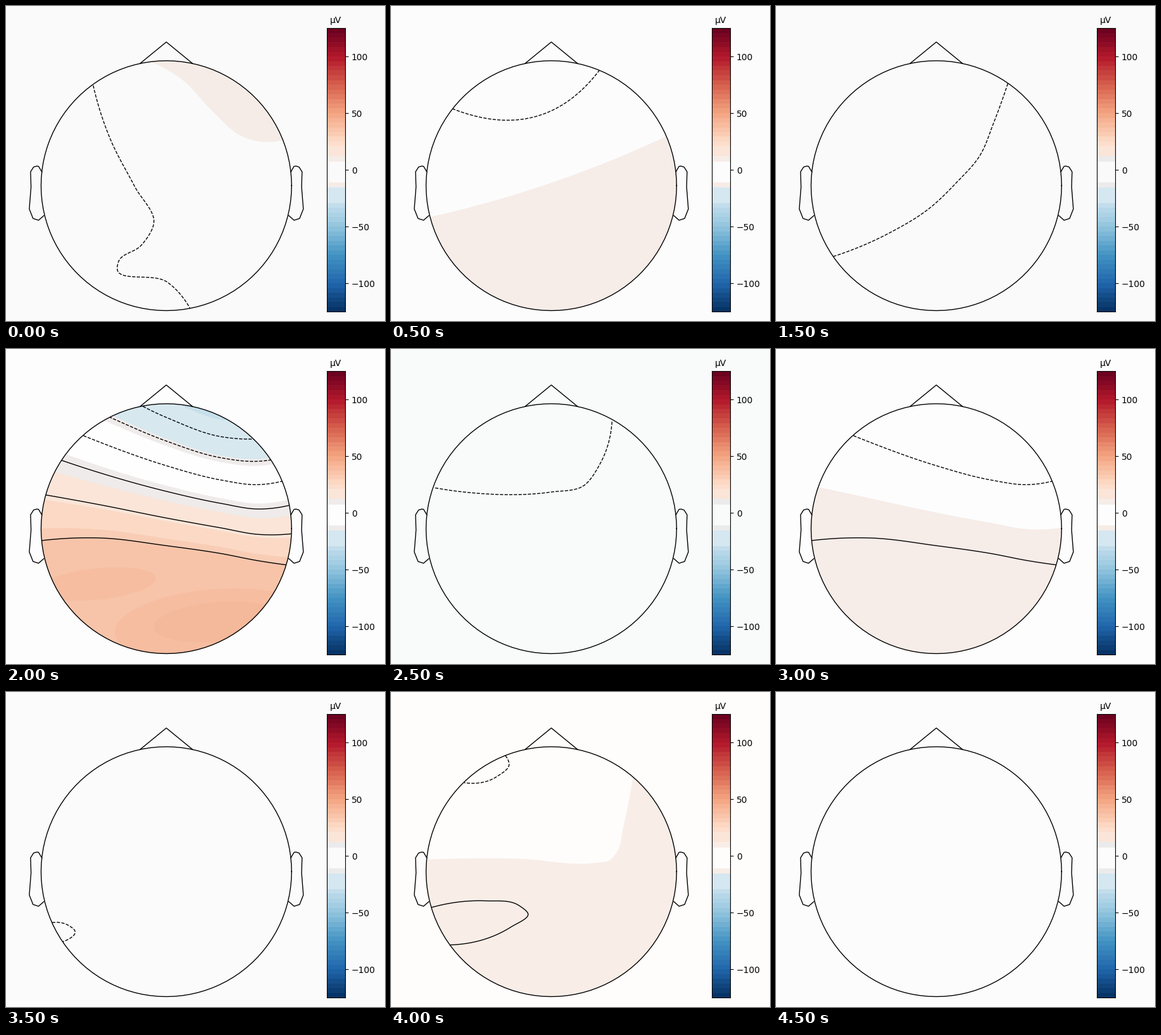
Write a matplotlib script that moves like this. It is 600 px wide and 500 px high and loops after 5 s.

```python
import numpy as np
import matplotlib
import matplotlib.pyplot as plt
from matplotlib.animation import FuncAnimation
from matplotlib.patches import Circle, Ellipse, Polygon

W, H, DPI = 600, 500, 100
CX, CY, R = 253.8, 285.2, 198.3

plt.rcParams["font.family"] = "DejaVu Sans"
fig = plt.figure(figsize=(W / DPI, H / DPI), dpi=DPI)
ax = fig.add_axes([0, 0, 1, 1])
ax.set_xlim(0, W)
ax.set_ylim(H, 0)
ax.axis("off")
disc = Circle((CX, CY), R, transform=ax.transData)
parts = []


def smooth(pts, n=14):
    """Hermite curve through the points, parametrised by chord length."""
    p = np.array(pts, float)
    t = np.r_[0, np.cumsum(np.hypot(*np.diff(p, axis=0).T))]
    m = np.gradient(p, t, axis=0, edge_order=2)
    u = np.linspace(0, 1, n)[:, None]
    out = []
    for k in range(len(p) - 1):
        h = t[k + 1] - t[k]
        out.append((2 * u**3 - 3 * u**2 + 1) * p[k]
                   + (u**3 - 2 * u**2 + u) * h * m[k]
                   + (3 * u**2 - 2 * u**3) * p[k + 1]
                   + (u**3 - u**2) * h * m[k + 1])
    return np.vstack(out)


def level(s):
    """Key points of the contour at height s of the back-to-front wave."""
    x = np.array([55, 150, 254, 340, 400, 453])
    base = np.array([165, 197, 226, 245, 254, 247])
    step = np.array([61, 49.5, 41.5, 38, 39.5, 44])
    bend = np.array([4.3, 1, 0.8, 0.9, 0.8, 2.2])
    return np.column_stack([x, base + step * s + bend * s**2])


def add(patch):
    ax.add_patch(patch)
    patch.set_clip_path(disc)
    parts.append(patch)


def line(pts, ls="-"):
    ln, = ax.plot(*smooth(pts).T, ls, color="k", lw=1, zorder=2)
    ln.set_clip_path(disc)
    parts.append(ln)


def dash(pts):
    line(pts, "--")


def fill(color, pts, edge=H):
    """Colour everything between the curve and the stage edge."""
    c = smooth(pts)
    (x0, y0), (x1, y1) = c[0], c[-1]
    rim = [(x1 + 60, y1), (W, edge), (0, edge), (x0 - 60, y0)]
    add(Polygon(np.vstack([c, rim]), fc=color, ec="none", zorder=1))


def lobe(color, x, y, a, b, tilt):
    add(Ellipse((x, y), 2 * a, 2 * b, angle=tilt, fc=color, ec="none",
                zorder=1))


def front_patch(pale):
    fill(pale, [(225, 87), (275, 114), (330, 170), (372, 206), (412, 216),
                (440, 212)], edge=0)
    dash([(138, 126), (165, 211), (204, 287), (234, 345), (214, 380),
          (178, 406), (176, 415), (255, 438), (292, 481)])


def right_rise(pale):
    fill(pale, [(62, 335), (250, 282), (440, 205)])
    dash([(97, 163), (240, 172), (330, 102)])


def mild_wave(pale):
    fill(pale, level(0.9))
    fill("#fae5d8", level(2.4))
    dash(level(-0.4))
    line(level(2))


def diagonal(pale):
    dash([(367, 123), (344, 187), (323, 237), (285, 281), (243, 321),
          (180, 360), (91, 397.5)])


def strong_wave(pale):
    fill("#c6dfeb", level(-5))
    for s, color in [(-3.85, "#d7e8ef"), (-2.1, pale), (-1.8, "#fefefe"),
                     (-0.22, pale), (0.37, "#fae5d8"), (1.12, "#fbd9c5"),
                     (1.75, "#f9cdb5"), (2, "#f7c4aa")]:
        fill(color, level(s))
    lobe("#f6bda0", 145, 373, 92, 25, -6)
    lobe("#f6bda0", 335, 440, 163, 59, -4)
    lobe("#f4b89a", 335, 433, 101, 31, -5)
    for s in range(-3, 3):
        line(level(s), "--" if s < 0 else "-")


def shelf(pale):
    dash([(70, 220.5), (120, 227.5), (254, 227), (305, 217), (330, 184),
          (350, 114)])


def soft_wave(pale):
    fill(pale, level(0.8))
    dash(level(-1))
    line(level(2))


def left_nub(pale):
    dash([(73, 366), (99, 370.5), (109, 379), (90, 396.5)])


def rear_pool(pale):
    fill(pale, [(55, 266), (200, 264.5), (325, 271), (345, 267.5),
                (357, 255), (368, 213), (383, 135)])
    dash([(181, 101), (187, 115), (168, 134), (116, 144)])
    line([(64, 342), (150, 331.5), (202, 338.5), (217, 352), (190, 373),
          (94, 401.5)])


def calm(pale):
    pass


# scene, backdrop, pale tone beside zero
SCENES = [
    (front_patch, "#fafafa", "#f5ece7"),
    (right_rise, "#fcfcfc", "#f6ece8"),
    (mild_wave, "#fdfdfd", "#f3ece9"),
    (diagonal, "#fafafa", "#ebebeb"),
    (strong_wave, "#fdfdfd", "#efebea"),
    (shelf, "#f9fbfa", "#ebebeb"),
    (soft_wave, "#fdfdfd", "#f6ece8"),
    (left_nub, "#fbfbfb", "#ebebeb"),
    (rear_pool, "#fefdfc", "#f9ede7"),
    (calm, "#fcfcfc", "#ebebeb"),
]


def draw_head():
    a = np.linspace(0, 2 * np.pi, 101)
    nose_y = np.sqrt(1 - 0.21**2)
    ear_x = 2 * np.array([.497, .510, .518, .5299, .5419, .54, .547, .532,
                          .510, .489])
    ear_y = 2 * np.array([.0555, .0775, .0783, .0746, .0555, -.0055, -.0932,
                          -.1313, -.1384, -.1199])
    outlines = [(np.cos(a), np.sin(a)),
                (np.array([-.21, 0, .21]), np.array([nose_y, 1.15, nose_y])),
                (ear_x, ear_y), (-ear_x, ear_y)]
    for x, y in outlines:
        ax.plot(CX + R * x, CY - R * y, color="k", lw=1, zorder=3)


def draw_bar(vmax=125, bands=60):
    bar = fig.add_axes([507.6 / W, 0.03, 29.6 / W, 0.9])
    bar.set_xlim(0, 1)
    bar.set_ylim(-vmax, vmax)
    bar.set_xticks([])
    bar.set_yticks(range(-100, 101, 50))
    bar.yaxis.tick_right()
    bar.set_title("µV", fontsize=10)

    def band(lo, hi, color):
        return bar.axhspan(lo, hi, fc=color, lw=0, antialiased=False)

    cmap = matplotlib.colormaps["RdBu_r"]
    edges = np.linspace(-vmax, vmax, bands + 1)
    for lo, hi in zip(edges, edges[1:]):
        band(lo, hi, cmap((lo + hi) / 4 / vmax + 0.5))
    band(-29.5, -15.5, "#d5e7f0")
    band(12, 21, "#fae5d8")
    return band(-15.5, 12, "w"), band(-11, 7, "w")


draw_head()
near_zero, zero = draw_bar()


def update(i):
    while parts:
        parts.pop().remove()
    scene, back, pale = SCENES[i % len(SCENES)]
    fig.set_facecolor(back)
    zero.set_facecolor(back)
    near_zero.set_facecolor(pale)
    scene(pale)
    return []


anim = FuncAnimation(fig, update, frames=len(SCENES), interval=500,
                     init_func=lambda: update(0), repeat=True, repeat_delay=0,
                     blit=False)
plt.show()
```
